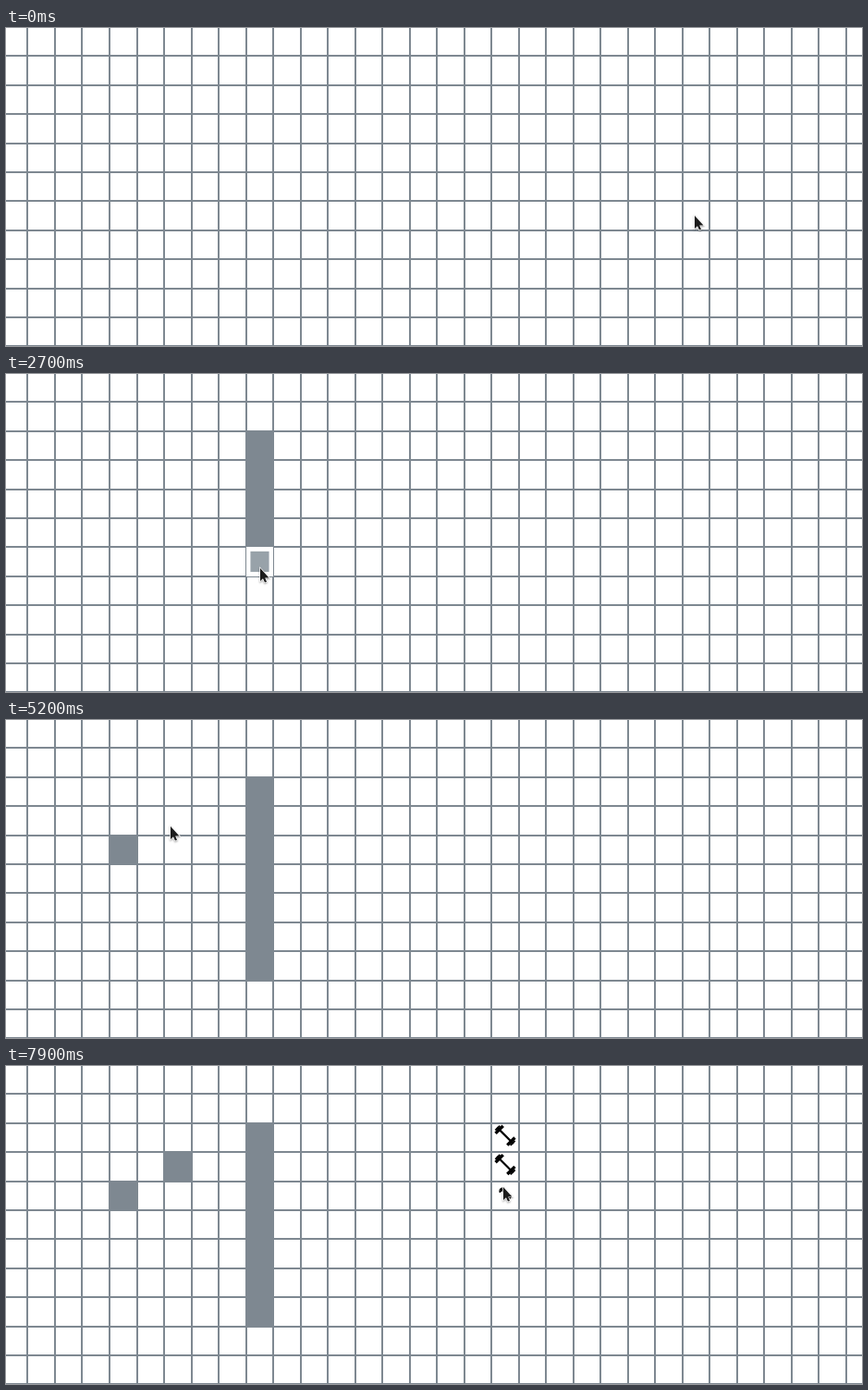
Animation, 926 px wide and 344 px high, one loop 8 s. Source, as an HTML page with a canvas:

```html
<!DOCTYPE html>
<html lang="en">
<head>
<meta charset="utf-8">
<title>Grid drawing</title>
<style>
  html, body { margin: 0; height: 100%; overflow: hidden; background: #fff; }
  canvas { display: block; }
</style>
</head>
<body>
<canvas id="stage" width="926" height="344"></canvas>
<script>
const LOOP = 8000, STEP = 100, GROW = 160;
const GRID = { x: 23.44, y: 30.4, w: 29.519, h: 31.4 };
const LINE = [126, 136, 145], PALE = [186, 196, 200];
const ctx = document.getElementById('stage').getContext('2d');

const lineX = k => Math.round(GRID.x + GRID.w * k);
const lineY = k => Math.round(GRID.y + GRID.h * k);
const lerp = (a, b, p) => a + (b - a) * p;
const clamp = p => Math.max(0, Math.min(1, p));
const ease = p => p * p * (3 - 2 * p);
const rgb = c => `rgb(${c.map(Math.round)})`;

// Eased pointer moves: start, end, and the point reached
const home = { x: 745, y: 203 };
const moves = [
  { from: 0, to: 100, x: 743, y: 203 },
  { from: 550, to: 900, x: 307, y: 149 },
  { from: 1000, to: 1320, x: 265, y: 84 },
  { from: 1500, to: 1700, x: 264, y: 77 },
  { from: 2000, to: 3070, x: 279, y: 261 },
  { from: 3500, to: 3900, x: 160, y: 131 },
  { from: 3900, to: 4300, x: 133, y: 141 },
  { from: 5100, to: 5225, x: 183, y: 112 },
  { from: 6100, to: 6400, x: 437, y: 179 },
  { from: 6400, to: 6800, x: 545, y: 108 },
  { from: 6800, to: 7200, x: 541, y: 75 },
  { from: 7400, to: 7950, x: 538, y: 132 }
];

function pointerAt(t) {
  let { x, y } = home;
  for (const move of moves) {
    const p = ease(clamp((t - move.from) / (move.to - move.from)));
    x = lerp(x, move.x, p);
    y = lerp(y, move.y, p);
  }
  return [x, y];
}

// While pressed, the pointer fills every cell it enters
const presses = [
  { from: 1980, to: 3100, draw: drawWall },
  { from: 4540, to: 4540, draw: drawWall },
  { from: 5480, to: 5480, draw: drawWall },
  { from: 7380, to: 7900, draw: drawWeight }
];

function cellsOf({ from, to, draw }) {
  const cells = [];
  for (let start = from; start <= to; start += 10) {
    const [x, y] = pointerAt(start);
    const col = Math.floor((x - GRID.x) / GRID.w);
    const row = Math.floor((y - GRID.y) / GRID.h);
    if (!cells.some(c => c.col === col && c.row === row)) cells.push({ col, row, start, draw });
  }
  return cells;
}
const cells = presses.flatMap(cellsOf);

function drawGrid() {
  ctx.fillStyle = '#fff';
  ctx.fillRect(0, 0, 926, 344);
  ctx.fillStyle = rgb(LINE);
  for (let k = 0; k <= 30; k++) ctx.fillRect(lineX(k) - 1, 0, 2, 344);
  for (let k = 0; k <= 10; k++) ctx.fillRect(0, lineY(k) - 1, 926, 2);
}

function drawWall(col, row, p) {
  const x = lineX(col), y = lineY(row);
  const w = lineX(col + 1) - x, h = lineY(row + 1) - y;
  const s = lerp(0.3, 1, p);
  ctx.fillStyle = '#fff';
  ctx.fillRect(x, y, w, h);
  ctx.fillStyle = rgb(LINE.map((c, i) => lerp(PALE[i], c, p)));
  ctx.fillRect(x + w * (1 - s) / 2, y + h * (1 - s) / 2, w * s, h * s);
}

function drawWeight(col, row, p) {
  const s = lerp(0.3, 1, p);
  ctx.save();
  ctx.translate(GRID.x + GRID.w * (col + 0.5), GRID.y + GRID.h * (row + 0.5) - 2.3);
  ctx.rotate(Math.PI / 4);
  ctx.scale(s, s);
  ctx.fillStyle = '#000';
  const bar = (x, w, h) => ctx.fillRect(x - w / 2, -h / 2, w, h);
  bar(0, 25, 2.2);
  for (const side of [-1, 1]) {
    bar(side * 9, 3.4, 11.5);
    bar(side * 11.5, 2, 7);
  }
  ctx.restore();
}

const arrow = new Path2D('M0 0V14L3 11.3L5 15.6L7 14.7L5.2 10.4H9.5Z');
function drawPointer(x, y) {
  ctx.save();
  ctx.translate(Math.round(x), Math.round(y));
  ctx.shadowColor = 'rgba(0,0,0,.4)';
  ctx.shadowBlur = 2;
  ctx.shadowOffsetY = 1;
  ctx.strokeStyle = '#fff';
  ctx.lineWidth = 1.4;
  ctx.stroke(arrow);
  ctx.shadowColor = 'transparent';
  ctx.fillStyle = '#1c1c1c';
  ctx.fill(arrow);
  ctx.restore();
}

function render(now) {
  const t = Math.floor((now % LOOP) / STEP) * STEP;
  drawGrid();
  for (const { col, row, start, draw } of cells) {
    if (t >= start) draw(col, row, clamp((t - start) / GROW));
  }
  drawPointer(...pointerAt(t));
}

let begin;
function tick(now) {
  begin ??= now;
  render(now - begin);
  requestAnimationFrame(tick);
}
requestAnimationFrame(tick);
</script>
</body>
</html>
```
